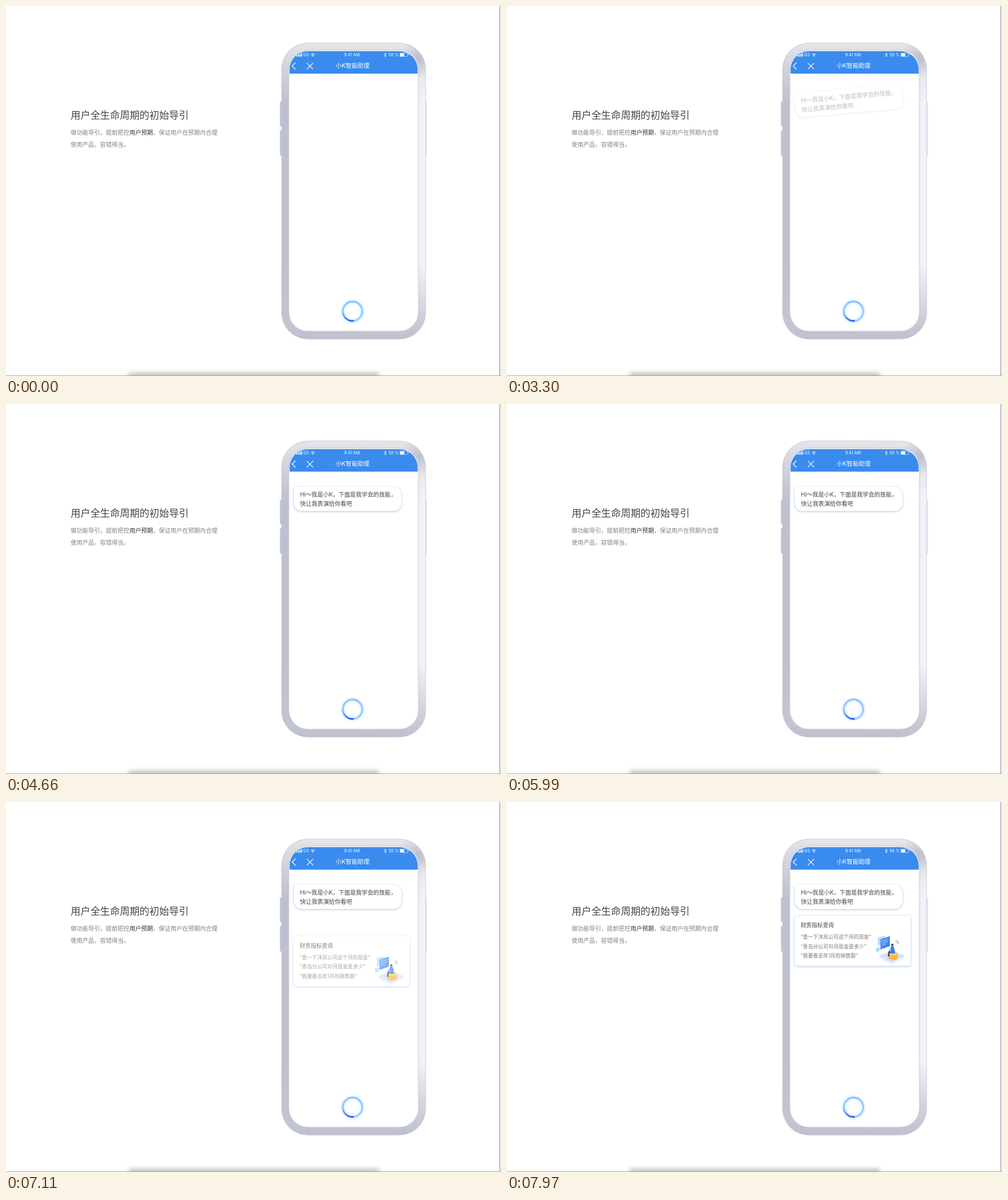
An HTML page for the animation above (8 s loop, 865 by 647 pixels).

```html
<!DOCTYPE html>
<html lang="zh-CN">
<head>
<meta charset="utf-8">
<title>初始导引</title>
<style>
  html, body { margin: 0; width: 100%; height: 100%; overflow: hidden; background: #fff; }
  svg { display: block; width: 865px; height: 647px; }
  text { font-family: Inter, "Noto Sans CJK SC", "Noto Sans CJK", sans-serif; fill: #444; }
  .title { font-size: 17.2px; font-weight: 500; }
  .lead { font-size: 10.28px; font-weight: 300; fill: #808080; }
  .lead tspan { font-weight: 500; fill: #333; }
  .bar { fill: #fff; }
  .status { font-size: 7.1px; fill: #fff; }
  .say { font-size: 10.15px; }
  .head { font-size: 9.7px; }
  .ask { font-size: 8.9px; fill: #777; }
  .panel { fill: #fff; filter: drop-shadow(0 1px 2px rgba(100, 135, 200, .5)); }

  .bubble {
    transform-origin: 597px 166px;
    animation: tilt 8s linear infinite;
  }
  .card { animation: rise 8s linear infinite; }

  @keyframes tilt {
    0% { opacity: 0; transform: rotate(-8deg); }
    39.25% { opacity: 0; transform: rotate(-8deg); animation-timing-function: cubic-bezier(.333, 1, .667, 1); }
    53.75%, 100% { opacity: 1; transform: rotate(0deg); }
  }
  @keyframes rise {
    0% { opacity: 0; transform: translateY(107px); }
    83.375% { opacity: 0; transform: translateY(107px); animation-timing-function: cubic-bezier(.333, .92, .667, 1); }
    100% { opacity: 1; transform: translateY(0); }
  }
</style>
</head>
<body>
<svg viewBox="0 0 865 647">
  <defs>
    <linearGradient id="body">
      <stop offset="0" stop-color="#bcbfcf"/>
      <stop offset=".06" stop-color="#c0c2d1"/>
      <stop offset=".5" stop-color="#cdced9"/>
      <stop offset=".94" stop-color="#efeff5"/>
      <stop offset="1" stop-color="#f5f5f9"/>
    </linearGradient>
    <linearGradient id="top" x2="0" y2="1">
      <stop offset="0" stop-color="#e6e6eb"/>
      <stop offset=".05" stop-color="#dddde4" stop-opacity=".85"/>
      <stop offset=".2" stop-color="#dddde4" stop-opacity="0"/>
      <stop offset=".75" stop-color="#c4c6d3" stop-opacity="0"/>
      <stop offset=".95" stop-color="#c3c5d2" stop-opacity=".9"/>
      <stop offset="1" stop-color="#bec0ce"/>
    </linearGradient>
    <radialGradient id="shade" gradientUnits="userSpaceOnUse" cx="721" cy="92" r="34">
      <stop offset="0" stop-color="#b4b4c0" stop-opacity=".75"/>
      <stop offset="1" stop-color="#b4b4c0" stop-opacity="0"/>
    </radialGradient>
    <linearGradient id="halo" x2="0" y2="1">
      <stop offset="0" stop-color="#7dc0fc"/>
      <stop offset="1" stop-color="#93cbfd"/>
    </linearGradient>
    <linearGradient id="arc" gradientUnits="userSpaceOnUse" x1="606" y1="551" x2="588" y2="530">
      <stop offset="0" stop-color="#3158f2"/>
      <stop offset=".45" stop-color="#4a83f6"/>
      <stop offset="1" stop-color="#7dc0fc" stop-opacity="0"/>
    </linearGradient>
    <linearGradient id="board" x2="1" y2="1">
      <stop offset="0" stop-color="#5aa2fa"/>
      <stop offset="1" stop-color="#3474e4"/>
    </linearGradient>
    <filter id="soft" x="-50%" y="-50%" width="200%" height="200%"><feGaussianBlur stdDeviation="2"/></filter>
    <filter id="dim" x="-10%" y="-300%" width="120%" height="700%"><feGaussianBlur stdDeviation="4"/></filter>
    <clipPath id="screen"><rect x="495.5" y="79" width="224" height="488.5" rx="32"/></clipPath>
  </defs>

  <!-- page edges -->
  <rect x="214" y="642" width="438" height="12" fill="#000" opacity=".28" filter="url(#dim)"/>
  <rect x="863" width="2" height="647" fill="#e9e9f2"/>
  <rect x="862" width="1.2" height="647" fill="#a5a5ba"/>
  <rect y="646" width="865" height="1" fill="#a8a8ac"/>

  <text class="title" x="113" y="196.7">用户全生命周期的初始导引</text>
  <text class="lead" x="113" y="224.5">做功能导引，提前把控<tspan>用户预期</tspan>，保证用户在预期内合理</text>
  <text class="lead" x="113" y="245.8">使用产品，容错得当。</text>

  <!-- phone -->
  <g fill="#c0c2d0">
    <rect x="478.7" y="167" width="5" height="43.5" rx="1.5"/>
    <rect x="478.7" y="217" width="5" height="44.5" rx="1.5"/>
    <rect x="731" y="167" width="4.8" height="95" rx="1.5" fill="#e4e4ec"/>
  </g>
  <g id="frame">
    <rect x="481.5" y="64.5" width="252" height="518" rx="46" fill="url(#body)"/>
    <rect x="481.5" y="64.5" width="252" height="518" rx="46" fill="url(#top)"/>
    <rect x="481.5" y="64.5" width="252" height="518" rx="46" fill="url(#shade)"/>
    <rect x="481.9" y="64.9" width="251.2" height="517.2" rx="45.6" fill="none" stroke="#c6c8d4" stroke-width=".8"/>
  </g>
  <rect x="494" y="77" width="227" height="492" rx="33.5" fill="#f1f1f6" stroke="#b9bbc9" stroke-width=".7"/>
  <g clip-path="url(#screen)">
    <rect x="495" y="78" width="225" height="490" fill="#fff"/>
    <rect x="495" y="78" width="225" height="40.3" fill="#3a8bee"/>
  </g>

  <!-- status bar -->
  <g fill="#fff">
    <rect x="507.5" y="86.2" width="1.7" height="2.3"/>
    <rect x="510.2" y="85" width="1.7" height="3.5"/>
    <rect x="512.9" y="83.8" width="1.7" height="4.7"/>
    <rect x="515.6" y="82.4" width="1.7" height="6.1"/>
    <circle cx="536.3" cy="87.6" r="1"/>
    <rect x="688.8" y="82.8" width="7" height="5.2" rx=".6"/>
  </g>
  <g fill="none" stroke="#fff">
    <path d="M532.9 84.6q3.4-2.8 6.8 0M534.3 86.2q2-1.6 4 0"/>
    <path d="M660.7 83.6l4 3.6-2 1.8v-7l2 1.8-4 3.6" stroke-width=".7"/>
    <rect x="688.3" y="82.3" width="13.4" height="6.2" rx="1.2" stroke-width=".6" stroke-opacity=".8"/>
    <path d="M703 84.3v2.2" stroke-width=".8"/>
    <path d="M506 99l-6 6 6 6M525.6 99.6l11 11m0-11l-11 11" stroke-width="1.2"/>
  </g>
  <text class="status" x="519.6" y="88">GS</text>
  <text class="status" x="604.6" y="88" text-anchor="middle">9:41 AM</text>
  <text class="status" x="668.6" y="88">58 %</text>
  <text class="bar" x="605.7" y="108.3" font-size="10.4" text-anchor="middle">小K智能助理</text>

  <!-- greeting -->
  <g class="bubble">
    <path class="panel" d="M506 145H677a14 14 0 0 1 14 14V173a14 14 0 0 1-14 14H517a14 14 0 0 1-14-14V148a3 3 0 0 1 3-3z"/>
    <text class="say" x="513.7" y="162.3">Hi～我是小K，下面是我学会的技能，</text>
    <text class="say" x="513.7" y="178">快让我表演给你看吧</text>
  </g>

  <!-- skill card -->
  <g class="card">
    <rect class="panel" x="502.8" y="199" width="202.4" height="87.5" rx="5"/>
    <text class="head" x="513.2" y="219.3">财务指标查询</text>
    <text class="ask" x="513.2" y="238.8">“查一下沐岚公司这个月的现金”</text>
    <text class="ask" x="513.2" y="255.5">“青岛分公司10月现金是多少”</text>
    <text class="ask" x="513.2" y="272.2">“我要看去年1月的销售额”</text>
    <g>
      <path d="M648 272l25-11 24 11-25 13z" fill="#e9f1fd"/>
      <path d="M650 269l23-10 22 10-23 12z" fill="#d3e3fb"/>
      <path d="M648 237l12-3v13l-12 4z" fill="#b5dcfc"/>
      <path d="M652.5 240l16.5-5.5v17.5l-16.5 6z" fill="url(#board)"/>
      <path d="M655 243.5l11-3.7M655 247l11-3.7M655 250.5l8-2.7" stroke="#b9d8ff" stroke-width=".9"/>
      <path d="M645 255.5l6-2v7l-6 2z" fill="#9ee2f6"/>
      <path d="M679 240.5l6 2.5v6l-6-2.5z" fill="#cfd4f1"/>
      <path d="M666.5 265v8c0 5 16.500 5 16.500 0v-8z" fill="#f2b13f"/>
      <ellipse cx="674.8" cy="265" rx="8.2" ry="3.4" fill="#ffd36b"/>
      <path d="M666.700 269c1 4 15 4 16.200 0M666.700 272.500c1 4 15 4 16.200 0" fill="none" stroke="#ffdb83" stroke-width=".8"/>
      <path d="M676 264l-8-2-1.500 8" fill="none" stroke="#2d3a66" stroke-width="2.400"/>
      <path d="M670.500 253q3-3 5.500 0l2.500 11q-4 2-8 0z" fill="#3f7fe3"/>
      <path d="M671.500 255l-4.500 6" stroke="#6ba5f4" stroke-width="1.600"/>
      <circle cx="673.300" cy="249.700" r="2" fill="#39405f"/>
    </g>
  </g>

  <!-- voice ring -->
  <g fill="none">
    <circle cx="605.6" cy="533.8" r="17" stroke="#8fc8ff" stroke-width="4" opacity=".65" filter="url(#soft)"/>
    <circle cx="605.6" cy="533.8" r="17" stroke="url(#halo)" stroke-width="2.4"/>
    <path d="M606.5 550.7A17 17 0 0 1 588.8 530.500" stroke="url(#arc)" stroke-width="2.8" stroke-linecap="round"/>
  </g>
</svg>
</body>
</html>
```
